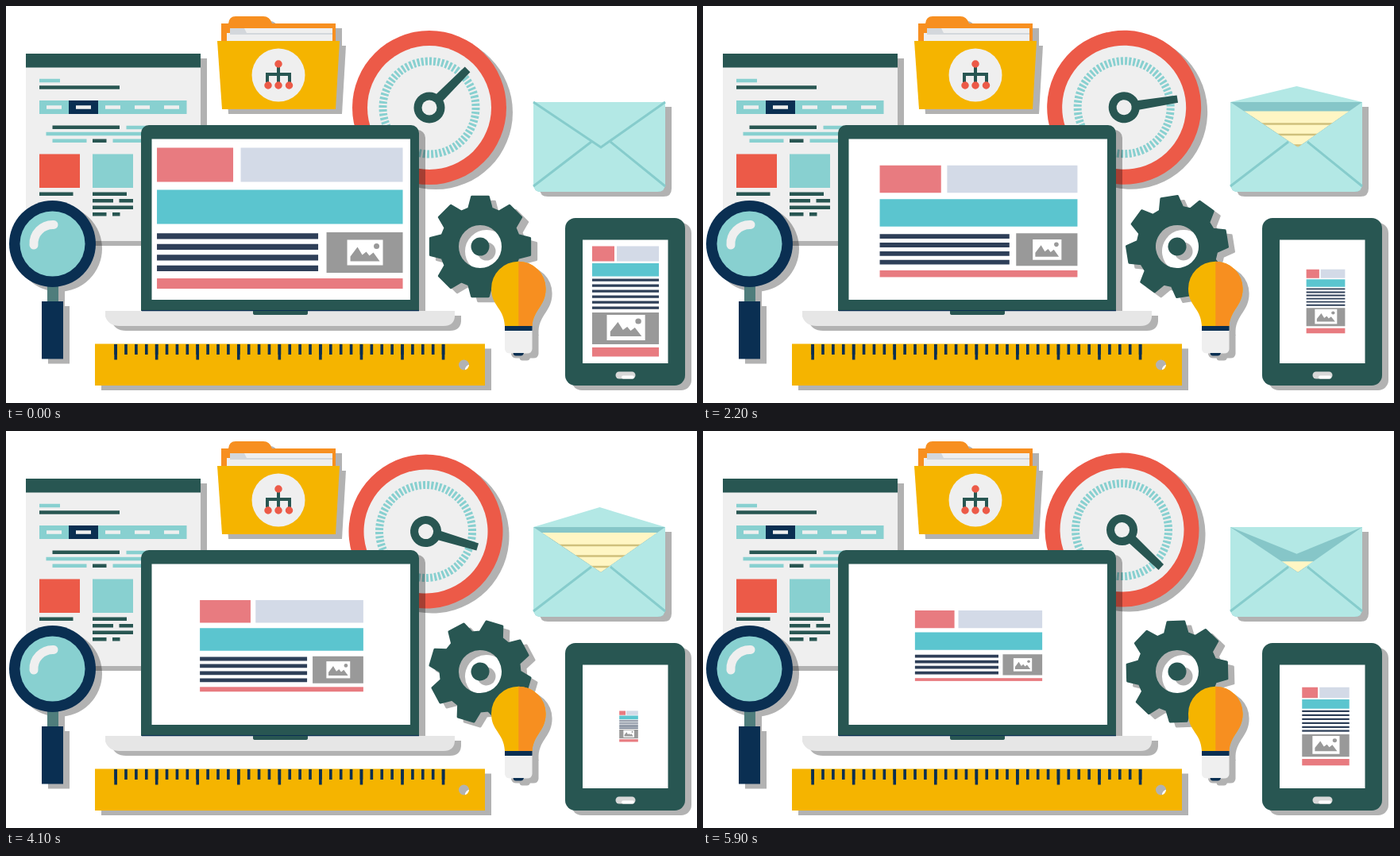
An HTML page that plays this animation: 870x500 px, repeating every 6 s.

```html
<!DOCTYPE html>
<html lang="en">
<head>
<meta charset="utf-8">
<title>Web design tools</title>
<style>
  html, body { margin: 0; width: 100%; height: 100%; overflow: hidden; background: #fff; }
  svg { display: block; }
  .shadow { filter: drop-shadow(8px 6px 0 rgba(0, 0, 0, .3)); }
  .dark { fill: #285652; }
  .navy { fill: #0a2f52; }
  .red { fill: #ec5a48; }
  .teal { fill: #88d0d0; }
  .pale { fill: #efefef; }
  .yellow { fill: #f5b400; }
  .orange { fill: #f78f20; }
  .mint { fill: #b3e8e5; }
  .pink { fill: #e87b80; }
  .blue { fill: #d3dae7; }
  .aqua { fill: #5bc5cf; }
  .grey { fill: #999; }
  .white { fill: #fff; }
  .ink { stroke: #2e3f58; }
  .mark { stroke: #0a2f52; }
  .seam { fill: none; stroke: #86cccc; stroke-width: 3; }
  .text { stroke-width: 4.5; }
</style>
</head>
<body>
<svg width="870" height="500" viewBox="0 0 870 500">
  <defs>
    <clipPath id="aboveFold"><path d="M660 0H834V118L749 178L660 118Z"/></clipPath>
    <g id="picture">
      <path class="white" d="M0 0H45V32H0Z"/>
      <path class="grey" d="M4 27V21L13 9L19 19L24 15L28 20L33 16L41 27Z"/>
      <circle class="grey" cx="37" cy="8" r="3.5"/>
    </g>
  </defs>

  <!-- Printed page -->
  <path class="pale shadow" d="M25 60H245V296H25Z"/>
  <path class="dark" d="M25 60H245V77.500H25Z"/>
  <path class="teal" d="M42 119H227.500V136H42ZM109 186.500H160V229H109Z"/>
  <path class="navy" d="M79 119H116V136H79Z"/>
  <path class="red" d="M42 186.500H93V229H42Z"/>
  <path class="text" d="M51 127.600H218" stroke="#efefef" stroke-dasharray="19 18"/>
  <path class="text" d="M42 94H68M151.500 153H186M50.500 161H190M58.500 169.700H101.500M134.500 169.700H180" stroke="#88d0d0"/>
  <path class="text" d="M42 102.500H143M58.500 152.800H143M109 169.700H126.500M42 236.800H84.500M109 236.800H152
    M109 245.300H135M142.500 245.300H160M109 253.800H160M109 262.300H126.500M134 262.300H143.500" stroke="#285652"/>

  <!-- Folder -->
  <g class="shadow">
    <path class="orange" d="M271 22H280Q281 13 289 13H324Q332 13 335 22H415V100H271Z"/>
    <path class="pale" d="M282 28H411V60H278V34H282Z"/>
    <path d="M282 28H300L303 34H411V36H282Z" fill="#d3d7dc"/>
    <path class="yellow" d="M266 44H420L415 130H272Z"/>
  </g>
  <circle class="pale" cx="343" cy="87" r="33.500"/>
  <path d="M343 76V96M329 96V86H357V96" fill="none" stroke="#285652" stroke-width="4"/>
  <path d="M343 73h0M330 100h0M343 100h0M356.500 100h0" stroke="#ec5a48" stroke-width="9.500" stroke-linecap="round"/>

  <!-- Dial -->
  <g class="shadow"><g id="dial">
    <circle class="red" cx="533" cy="128" r="97"/>
    <g transform="translate(533 128) rotate(45)">
      <circle class="pale" r="78"/>
      <circle r="58.500" fill="none" stroke="#88d0d0" stroke-width="10" pathLength="72" stroke-dasharray=".58 .42"/>
      <path class="dark" d="M-6 -15L-4.700 -68H4.700L6 -15Z"/>
      <circle class="dark" r="19.500"/>
      <circle class="pale" r="9.500"/>
    </g>
  </g></g>

  <!-- Laptop -->
  <g class="shadow">
    <rect class="dark" x="170" y="150" width="350" height="246" rx="10"/>
    <path d="M125 384H565V391Q564 403 551 403H143Q129 403 125 391Z" fill="#e6e6e6"/>
  </g>
  <path class="navy" d="M171 383H520V384.200H171Z"/>
  <path class="dark" d="M311 384H380V387Q380 389 377 389H314Q311 389 311 387Z"/>
  <path class="white" d="M183.500 167.500H509V370H183.500Z"/>
  <g id="desktopSite"><g transform="translate(-154.750 -88.750)">
    <path class="pink" d="M0 0H96V43H0Z"/>
    <path class="blue" d="M105.500 0H309.500V43H105.500Z"/>
    <path class="aqua" d="M0 53H309.500V96H0Z"/>
    <path class="ink" d="M101.500 107.700V157" stroke-width="203" stroke-dasharray="7.200 6.300"/>
    <path class="grey" d="M213.500 106.500H309.500V157.500H213.500Z"/>
    <use href="#picture" x="239.500" y="116"/>
    <rect id="footer" class="pink" y="164.500" width="309.500"/>
  </g></g>

  <!-- Magnifier -->
  <g class="shadow">
    <path d="M52 350H66V374H52Z" fill="#4f7d7c"/>
    <path class="navy" d="M45 372H72V444.500H45Z"/>
    <circle class="navy" cx="58.500" cy="299.500" r="54.500"/>
  </g>
  <circle class="teal" cx="58.500" cy="299.500" r="41"/>
  <path d="M35 301A24 24 0 0 1 60 275.500" fill="none" stroke="#efefef" stroke-width="11" stroke-linecap="round"/>

  <!-- Ruler -->
  <path class="yellow shadow" fill-rule="evenodd" d="M112 425.500H603V478H112ZM570 452a6.500 6.500 0 1 0 13 0a6.500 6.500 0 1 0 -13 0Z"/>
  <path class="mark" d="M136.300 432.500H552.500" stroke-width="13" stroke-dasharray="3.600 9.290"/>
  <path class="mark" d="M136.300 435.700H552.500" stroke-width="19.500" stroke-dasharray="3.600 47.960"/>

  <!-- Gear -->
  <g class="shadow"><g id="gear">
    <path id="cog" class="dark" fill-rule="evenodd" stroke="#285652" stroke-width="3" stroke-linejoin="round"/>
    <circle class="dark" r="11.500"/>
  </g></g>

  <!-- Bulb -->
  <g class="shadow">
    <path class="yellow" d="M628 403C627 380 611 378 611 356A34.300 34.300 0 0 1 679.600 356C679.600 378 664 382 662.500 403Z"/>
    <path class="pale" d="M628 408H662.500V432Q662 437.500 656 437.500H635Q628.500 437.500 628 432Z"/>
    <path class="navy" d="M628 403H662.500V409H628ZM638.500 437H652Q651 440.500 648 440.500H642Q639 440.500 638.500 437Z"/>
  </g>
  <path class="orange" d="M645.300 321.700A34.300 34.300 0 0 1 679.600 356C679.600 378 664 382 662.500 403H645.300Z"/>

  <!-- Envelope -->
  <path id="flapUp" class="mint"/>
  <path class="shadow" fill="#86c6c8" d="M664 121H830V224Q830 234 820 234H674Q664 234 664 224Z"/>
  <g class="shadow"><g clip-path="url(#aboveFold)"><g id="letter">
    <path d="M674.500 0H820V120H674.500Z" fill="#fff6c4"/>
    <path d="M748 14.700V72" stroke="#cfc07c" stroke-width="118" stroke-dasharray="2.500 11"/>
  </g></g></g>
  <path class="mint" d="M664 121L749 178L830 121V224Q830 234 820 234H674Q664 234 664 224Z"/>
  <path class="seam" d="M664 227L737 171M830 227L761 171"/>
  <path id="flapDown" class="mint"/>
  <path id="flapSeam" class="seam" d="M664 121L749 178L830 121"/>

  <!-- Tablet -->
  <rect class="dark shadow" x="704" y="267" width="151" height="211" rx="13"/>
  <path class="white" d="M726 294.500H833.500V450H726Z"/>
  <rect x="767.500" y="460.500" width="25" height="9" rx="4.500" fill="#d8d8d8"/>
  <rect class="white" x="775" y="465.500" width="16" height="4" rx="2"/>
  <g id="tabletSite"><g transform="translate(-42 -69.500)">
    <path class="pink" d="M0 0H28V19H0ZM0 127.500H84V139H0Z"/>
    <path class="blue" d="M31 0H84V19H31Z"/>
    <path class="aqua" d="M0 21.500H84V38H0Z"/>
    <path class="ink" d="M42 41V80" stroke-width="84" stroke-dasharray="3.200 3.800"/>
    <path class="grey" d="M0 83.500H84V123.500H0Z"/>
    <use href="#picture" transform="translate(18.500 86.500) scale(1.070 1)"/>
  </g></g>
</svg>

<script>
const byId = id => document.getElementById(id);
const clamp = (v, low, high) => Math.min(high, Math.max(low, v));
const place = (id, transform) => byId(id).setAttribute("transform", transform);

// Eight-toothed gear with a round hole
const polar = (r, a) => `${r * Math.sin(a)} ${-r * Math.cos(a)}`;
const corners = [[50, -.29], [63.5, -.165], [63.5, .165], [50, .29]];
const teeth = Array.from({ length: 8 }, (_, i) =>
  corners.map(([r, a]) => polar(r, a + i * Math.PI / 4)).join("L"));
byId("cog").setAttribute("d",
  `M${teeth.join("L")}ZM-28.5 0a28.5 28.5 0 1 0 57 0a28.5 28.5 0 1 0 -57 0Z`);

// Most poses last a tenth of a second; every fourth one is held
function poseTime(ms) {
  const tick = Math.floor(ms % 6000 / 100);
  return (tick > 1 && tick % 4 === 1 ? tick - 1 : tick) / 10;
}

// Steady from 0 to 1 over six seconds, slightly ahead after a quicker second
const progressAt = t => Math.max(t / 6, Math.min(.2 * t - .04, 1 - .158 * (6 - t)));

function drawEnvelope(progress) {
  const lift = clamp(635 * (.233 - Math.abs(progress % .5 - .288)), 0, 117);
  const apex = 178 - lift;
  const flap = `M664 121L747.5 ${apex}L830 121Z`;
  byId("flapUp").setAttribute("d", apex < 121 ? flap : "");
  byId("flapDown").setAttribute("d", apex < 121 ? "" : flap);
  byId("flapSeam").style.display = lift ? "none" : "";
  byId("letter").style.display = lift ? "" : "none";
  place("letter", `translate(0 ${apex + Math.min(32, lift * .41)})`);
}

function draw(ms) {
  const progress = progressAt(poseTime(ms));
  const settle = Math.max(0, 1 - 4 * progress);
  const tabletScale = Math.max(1 - 1.05 * progress, 1.83 * progress - 1.093);

  place("dial", `rotate(${90 * progress} 532 123.5)`);
  place("gear", `translate(597 303) rotate(${90 * progress})`);
  place("desktopSite",
    `translate(${347 - 2.2 * settle} ${272 - 4.7 * settle}) scale(${1 - .49 * progress})`);
  byId("footer").setAttribute("height", 13 - 6 * progress);
  place("tabletSite", `translate(${784 - 4 * settle} 372) scale(${tabletScale})`);
  drawEnvelope(progress);
}

const start = performance.now();
function loop() {
  draw(performance.now() - start);
  requestAnimationFrame(loop);
}
loop();
</script>
</body>
</html>
```
